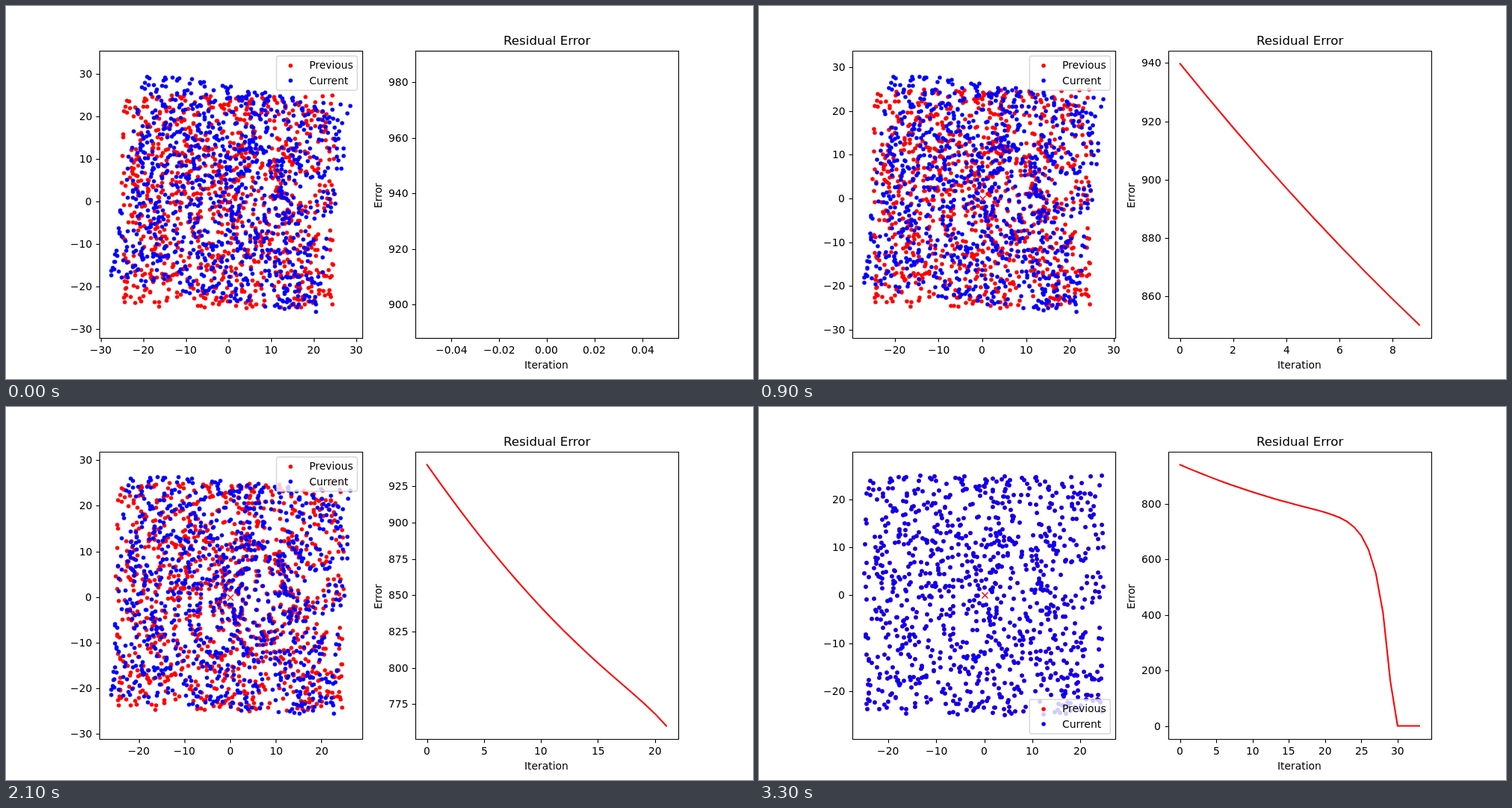
Write an HTML page with a canvas that moves like this. It is 1000 by 500 pixels and loops after 3400 ms.

```html
<!DOCTYPE html>
<html lang="en">
<head>
<meta charset="utf-8">
<title>Scan matching</title>
<style>
html, body { margin: 0; width: 100%; height: 100%; overflow: hidden; background: #fff; }
canvas { display: block; }
</style>
</head>
<body>
<canvas id="stage" width="1000" height="500"></canvas>
<script>
const ctx = document.getElementById('stage').getContext('2d');
const STEP = 100, STEPS = 34, COUNT = 1000;
const LEFT = { x0: 125, x1: 477.27 }, RIGHT = { x0: 547.73, x1: 900 };
const TOP = 60, BOTTOM = 445;
const SMALL = '13.89px "DejaVu Sans", sans-serif';
const LARGE = '16.67px "DejaVu Sans", sans-serif';
const RED = '#f00', BLUE = '#00f';

// Outermost points, which set the extent of the cloud
const extremes = [
  [-25, 4.5], [24.85, 10], [-13.3, 24.95], [4.2, -25],
  [-23.8, 23.8], [24.45, 24.9], [24.5, -24.2], [-24.5, -22.6]
];

function randomizer(seed) {
  return () => {
    seed = (seed + 0x6D2B79F5) | 0;
    let t = Math.imul(seed ^ (seed >>> 15), 1 | seed);
    t = (t + Math.imul(t ^ (t >>> 7), 61 | t)) ^ t;
    return ((t ^ (t >>> 14)) >>> 0) / 4294967296;
  };
}

function makePoints() {
  const rand = randomizer(7), points = [...extremes];
  while (points.length < COUNT) {
    const x = (rand() - 0.5) * 49.6, y = (rand() - 0.5) * 49.8;
    // Keep the corners inside the extent when the cloud is turned
    const turnedX = 0.986 * x + 0.165 * y, turnedY = 0.986 * y - 0.165 * x;
    if (Math.abs(turnedX) < 28 && Math.abs(turnedY) < 27.4) points.push([x, y]);
  }
  return points;
}
const previous = makePoints();

// The misalignment shrinks steadily, then collapses at the end
function currentAt(k) {
  const degrees = (9.5 - 0.243 * k) * Math.tanh(Math.max(0, 29 - k) / 3.6);
  const shift = (degrees / 9.5) ** 2;
  const angle = degrees * Math.PI / 180;
  const c = Math.cos(angle), s = Math.sin(angle);
  return previous.map(([x, y]) => [c * x + s * y + 0.45 * shift, c * y - s * x + 1.97 * shift]);
}

function errorAt(k) {
  const trend = 939.7 - 11.25 * k + 0.145 * k * k;
  return trend * Math.max(0, 1 - Math.exp(-0.55 * (29.45 - k)));
}

function text(str, x, y, align = 0.5, font = SMALL) {
  ctx.font = font;
  ctx.fillStyle = '#000';
  ctx.fillText(str, Math.round(x - align * ctx.measureText(str).width), y);
}

function line(x0, y0, x1, y1) {
  ctx.beginPath();
  ctx.moveTo(x0, y0);
  ctx.lineTo(x1, y1);
  ctx.stroke();
}

const snap = v => Math.round(v) + 0.5;

function dots(list, color) {
  ctx.fillStyle = color;
  ctx.beginPath();
  for (const [x, y] of list) {
    const px = Math.round(x), py = Math.round(y);
    ctx.moveTo(px + 2.78, py);
    ctx.arc(px, py, 2.78, 0, 2 * Math.PI);
  }
  ctx.fill();
}

// Round tick values covering lo..hi in at most `bins` intervals
function ticks(lo, hi, bins) {
  const raw = (hi - lo) / bins;
  const power = 10 ** Math.floor(Math.log10(raw));
  const step = power * [1, 2, 2.5, 5, 10].find(s => s * power >= raw - 1e-9);
  let digits = 0;
  while (digits < 4 && Math.abs(step - Number(step.toFixed(digits))) > 1e-9) digits++;
  const out = [];
  for (let i = Math.ceil(lo / step); i * step <= hi; i++) {
    const value = i * step;
    const label = Math.abs(value).toFixed(digits);
    out.push({ value, label: value < 0 ? '\u2212' + label : label });
  }
  return out;
}

function scales(box, xlim, ylim) {
  return {
    mapX: v => box.x0 + (v - xlim[0]) / (xlim[1] - xlim[0]) * (box.x1 - box.x0),
    mapY: v => BOTTOM - (v - ylim[0]) / (ylim[1] - ylim[0]) * (BOTTOM - TOP)
  };
}

function axes(box, xlim, ylim) {
  const { mapX, mapY } = scales(box, xlim, ylim);
  const left = snap(box.x0);
  ctx.strokeStyle = '#000';
  ctx.lineWidth = 1.11;
  ctx.lineCap = 'butt';
  for (const { value, label } of ticks(...xlim, 8)) {
    const x = mapX(value);
    line(snap(x), BOTTOM + 0.5, snap(x), BOTTOM + 5.4);
    text(label, x, 466);
  }
  for (const { value, label } of ticks(...ylim, 9)) {
    const y = mapY(value);
    line(left, snap(y), left - 4.9, snap(y));
    text(label, box.x0 - 9.7, Math.round(y + 5), 1);
  }
  ctx.strokeRect(left, TOP + 0.5, snap(box.x1) - left, BOTTOM - TOP);
}

function legend(top) {
  ctx.beginPath();
  ctx.roundRect(362.2, top, 108.1, 46, 2.8);
  ctx.fillStyle = 'rgba(255,255,255,0.8)';
  ctx.fill();
  ctx.strokeStyle = 'rgba(204,204,204,0.8)';
  ctx.lineWidth = 1.39;
  ctx.stroke();
  [['Previous', RED], ['Current', BLUE]].forEach(([name, color], i) => {
    const y = top + 12.6 + i * 20.5;
    dots([[381, y]], color);
    text(name, 406.4, Math.round(y + 4.6), 0);
  });
}

// Range of the values with a 5 % margin; a single value is widened first
function padded(values) {
  let lo = Math.min(...values), hi = Math.max(...values);
  if (lo === hi) {
    const d = Math.abs(lo) * 0.05 || 0.05;
    lo -= d;
    hi += d;
  }
  const margin = (hi - lo) * 0.05;
  return [lo - margin, hi + margin];
}

function drawCloud(k) {
  const current = currentAt(k);
  const all = [...previous, ...current];
  const xlim = padded(all.map(p => p[0])), yfit = padded(all.map(p => p[1]));

  // Equal units on both axes: widen y around its middle
  const middle = (yfit[0] + yfit[1]) / 2;
  const half = (xlim[1] - xlim[0]) / (LEFT.x1 - LEFT.x0) * (BOTTOM - TOP) / 2;
  const ylim = [middle - half, middle + half];

  const { mapX, mapY } = scales(LEFT, xlim, ylim);
  const place = ([x, y]) => [mapX(x), mapY(y)];
  dots(previous.map(place), RED);
  dots(current.map(place), BLUE);

  const x = snap(mapX(0)), y = snap(mapY(0)), r = 4;
  ctx.strokeStyle = RED;
  ctx.lineWidth = 1.39;
  ctx.lineCap = 'butt';
  line(x - r, y - r, x + r, y + r);
  line(x - r, y + r, x + r, y - r);

  axes(LEFT, xlim, ylim);
  legend(k < 23 ? 67 : 392);
}

function drawErrors(k) {
  const errors = Array.from({ length: k + 1 }, (_, i) => errorAt(i));
  const xlim = padded([0, k]), ylim = padded(errors);
  const { mapX, mapY } = scales(RIGHT, xlim, ylim);
  axes(RIGHT, xlim, ylim);

  if (k > 0) {
    ctx.strokeStyle = RED;
    ctx.lineWidth = 2.08;
    ctx.lineJoin = 'round';
    ctx.lineCap = 'square';
    ctx.beginPath();
    errors.forEach((e, i) => ctx.lineTo(mapX(i), mapY(e)));
    ctx.stroke();
  }

  text('Residual Error', 723.9, 52, 0.5, LARGE);
  text('Iteration', 723.9, 486);
  ctx.save();
  ctx.translate(503, 254);
  ctx.rotate(-Math.PI / 2);
  text('Error', 0, 0);
  ctx.restore();
}

let shown = -1;
function tick(now) {
  const k = Math.floor(now / STEP) % STEPS;
  if (k !== shown) {
    shown = k;
    ctx.fillStyle = '#fff';
    ctx.fillRect(0, 0, 1000, 500);
    drawCloud(k);
    drawErrors(k);
  }
  requestAnimationFrame(tick);
}
tick(performance.now());
</script>
</body>
</html>
```
